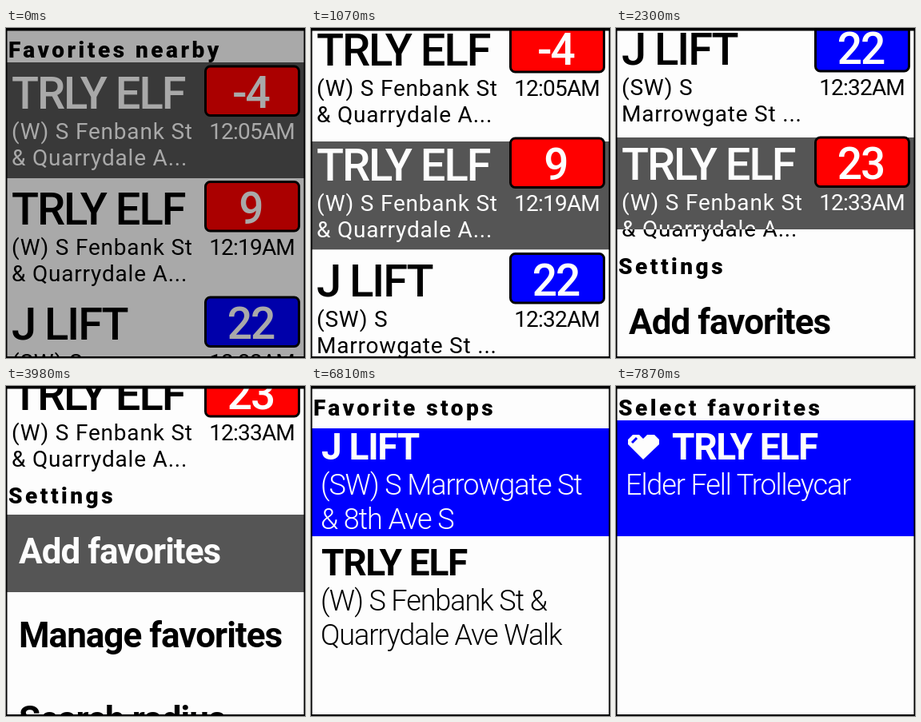
Recreate the animation shown at these times as an HTML page. Size 374 px wide and 413 px high, loop 8 s.

```html
<!DOCTYPE html>
<html lang="en">
<head>
<meta charset="utf-8">
<title>Transit watch menu</title>
<style>
  html, body { margin: 0; width: 100%; height: 100%; overflow: hidden; background: #fdfdfd; }
  svg { display: block; width: 374px; height: 413px; font-family: Roboto, "Liberation Sans", sans-serif; }
  text { white-space: pre; }
  .header { font-size: 28px; font-weight: 900; letter-spacing: 3.5px; }
  .route { font-size: 56px; font-weight: 500; letter-spacing: -2px; }
  .count { font-size: 55px; font-weight: 500; letter-spacing: -2px; text-anchor: middle; fill: #fdfdfd; }
  .note { font-size: 28px; letter-spacing: .8px; }
  .time { font-size: 28px; letter-spacing: -.8px; text-anchor: end; }
  .item { font-size: 44px; font-weight: 700; letter-spacing: -1px; }
  .stop { font-size: 46px; font-weight: 700; letter-spacing: -1.3px; }
  .place { font-size: 36px; font-weight: 300; letter-spacing: -1.1px; }
</style>
</head>
<body>
<svg id="stage" viewBox="0 0 374 413"></svg>
<script>
const LOOP = 8000, ROW = 144.5, FIRST = 43, SETTINGS = FIRST + 4 * ROW + 37;
const RED = '#f00', BLUE = '#00f';
const TRAM = 'TRLY ELF', BUS = 'J LIFT';

const text = (cls, x, y, str) =>
  `<text class="${cls}" x="${x}" y="${y}">${str.replace(/&/g, '&amp;')}</text>`;
const header = (rowTop, str) => text('header', 3, rowTop - 6, str);

function departure(index, route, color, count, time, line1, line2) {
  const y = FIRST + index * ROW;
  return text('route', 7, y + 58, route)
    + `<rect x="249.5" y="${y + 5}" width="117" height="61.5" rx="6" fill="${color}" stroke="#000" stroke-width="3"/>`
    + text('count', 306, y + 57, count)
    + text('note', 7, y + 96, line1)
    + text('time', 361, y + 96, time)
    + text('note', 7, y + 129, line2);
}

function stop(index, name, line1, line2, x = 13) {
  const y = FIRST + index * ROW;
  return text('stop', x, y + 49, name)
    + text('place', 12, y + 93, line1)
    + text('place', 12, y + 136, line2);
}

const tramStop = ['(W) S Fenbank St', '& Quarrydale A...'];
const heart =
  '<path d="M34 92L15 73V67L21 61H29L34 66L39 61H48L54 67V73Z"/>' +
  `<path d="M20 71L26 65" stroke="${BLUE}" stroke-width="3"/>`;

const screens = {
  menu: {
    color: '#555',
    body: header(FIRST, 'Favorites nearby')
      + departure(0, TRAM, RED, '-4', '12:05AM', ...tramStop)
      + departure(1, TRAM, RED, '9', '12:19AM', ...tramStop)
      + departure(2, BUS, BLUE, '22', '12:32AM', '(SW) S', 'Marrowgate St ...')
      + departure(3, TRAM, RED, '23', '12:33AM', ...tramStop)
      + header(SETTINGS, 'Settings')
      + ['Add favorites', 'Manage favorites', 'Search radius']
        .map((label, i) => text('item', 16, SETTINGS + 69 + i * 105, label)).join('')
  },
  stops: {
    color: BLUE,
    body: header(FIRST, 'Favorite stops')
      + stop(0, BUS, '(SW) S Marrowgate St', '& 8th Ave S')
      + stop(1, TRAM, '(W) S Fenbank St &', 'Quarrydale Ave Walk')
  },
  select: {
    color: BLUE,
    body: header(FIRST, 'Select favorites') + heart + stop(0, TRAM, 'Elder Fell Trolleycar', '', 70)
  }
};

// start time, screen, scroll, highlight top, highlight bottom, sideways shift
const steps = [
  [0, 'menu', 0, 43, 188],
  [370, 'menu', 0, 53, 188],
  [580, 'menu', 54.5, 133, 284],
  [760, 'menu', 54.5, 133, 277.5],
  [1070, 'menu', 54.5, 142, 277.5],
  [1320, 'menu', 199, 133, 284],
  [1470, 'menu', 199, 133, 277.5],
  [1660, 'menu', 199, 142, 277.5],
  [1870, 'menu', 344.5, 132, 284],
  [2030, 'menu', 344.5, 132, 277],
  [2300, 'menu', 344.5, 137, 252],
  [2460, 'menu', 505, 153, 265],
  [2580, 'menu', 505, 153, 258],
  [3980, 'menu', 505, 161, 258],
  [4040, 'menu', 610, 153, 265],
  [4100, 'menu', 610, 153, 258],
  [5060, 'stops', 0, 43, 188, 24],
  [5180, 'stops', 0, 43, 188],
  [6810, 'stops', 0, 53, 188],
  [6930, 'stops', 0, 188, 333],
  [7550, 'stops', 0, 188, 333, -20],
  [7630, 'stops', 0, 188, 333, -90],
  [7710, 'select', 0, 43, 188, 120],
  [7790, 'select', 0, 43, 188, 20],
  [7870, 'select', 0, 43, 188]
];

const stage = document.getElementById('stage');
stage.innerHTML =
  '<clipPath id="selection"><rect class="bar" width="374"/></clipPath>' +
  '<rect width="374" height="413" fill="#fdfdfd"/>' +
  Object.entries(screens).map(([name, { color, body }]) =>
    `<g id="${name}"><g class="content">${body}</g>` +
    `<g clip-path="url(#selection)"><rect class="bar" width="374" fill="${color}"/>` +
    `<g class="content" fill="#fdfdfd">${body}</g></g></g>`).join('') +
  '<rect id="dim" width="374" height="413" opacity=".333"/>' +
  '<path d="M0 0H374V413H0ZM1.5 3.5V411H372.5V3.5Z" fill-rule="evenodd"/>';

const bars = stage.querySelectorAll('.bar');
const contents = stage.querySelectorAll('.content');
const groups = Object.keys(screens).map(name => document.getElementById(name));
const dim = document.getElementById('dim');

function render(ms) {
  const [, screen, scroll, top, bottom, shift = 0] = steps.findLast(step => step[0] <= ms);
  for (const group of groups) {
    group.style.display = group.id === screen ? '' : 'none';
    group.setAttribute('transform', `translate(${shift} 0)`);
  }
  for (const bar of bars) {
    bar.setAttribute('y', top);
    bar.setAttribute('height', bottom - top);
  }
  for (const content of contents) content.setAttribute('transform', `translate(0 ${-scroll})`);
  dim.style.display = ms < 60 ? '' : 'none';
}

const start = performance.now();
function tick() {
  render((performance.now() - start) % LOOP);
  requestAnimationFrame(tick);
}
tick();
</script>
</body>
</html>
```
